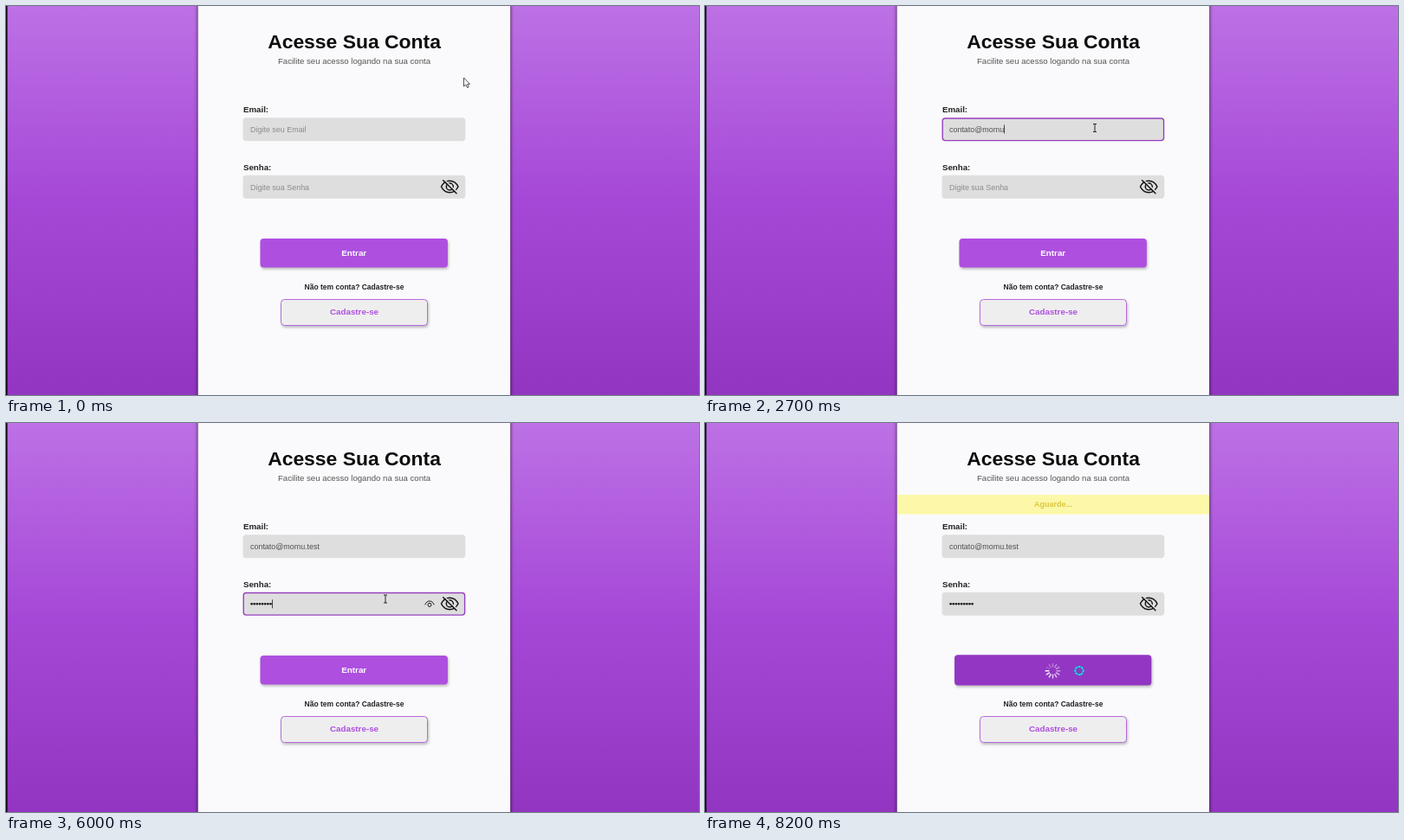
These frames come from a looping animation (800x450 px, 8.3 s). An HTML page:

```html
<!DOCTYPE html>
<html lang="pt-BR">
<head>
<meta charset="utf-8">
<title>Acesse Sua Conta</title>
<style>
  html, body { margin: 0; width: 100%; height: 100%; overflow: hidden; }
  svg { display: block; width: 100vw; height: 100vh; font-family: "Liberation Sans", Arial, sans-serif; }
  .bold { font-weight: bold; }
  .mid { text-anchor: middle; }
  .label { font-size: 9.7px; fill: #222; }
  .value { font-size: 8.93px; fill: #505050; }
  .hint { font-size: 8.95px; fill: #8b8b8b; }
  .field { fill: #dedede; stroke-width: 1.4; }
  .line { fill: none; stroke: #161616; }
  .button { filter: drop-shadow(1.5px 2px 1.5px rgba(0, 0, 0, .25)); }
</style>
</head>
<body>
<svg viewBox="0 0 800 450">
  <defs>
    <linearGradient id="sky" x2="0" y2="1">
      <stop stop-color="#bd71e5"/>
      <stop offset=".5" stop-color="#a548d7"/>
      <stop offset="1" stop-color="#9236c1"/>
    </linearGradient>
  </defs>
  <rect width="800" height="450" fill="url(#sky)"/>
  <rect width="1.6" height="450" fill="#100616"/>
  <rect x="221.7" y="-20" width="360.4" height="490" fill="#fafafc" style="filter:drop-shadow(0 0 2px rgba(0,0,0,.8))"/>

  <text class="bold mid" x="402" y="48.7" font-size="22.9" fill="#0d0d0d">Acesse Sua Conta</text>
  <text class="mid" x="402" y="67.2" font-size="9.6" fill="#555">Facilite seu acesso logando na sua conta</text>

  <g id="notice">
    <rect x="222" y="83" width="360" height="22.5" fill="#fcf8a8"/>
    <text class="bold mid" x="402" y="97.4" font-size="9" fill="#dbc63f">Aguarde...</text>
  </g>

  <text class="bold label" x="274" y="123.2">Email:</text>
  <rect id="emailField" class="field" x="274.2" y="130" width="255.4" height="25.6" rx="3"/>
  <text id="emailHint" class="hint" x="282" y="146">Digite seu Email</text>
  <text id="email" class="value" x="282" y="146"></text>

  <text class="bold label" x="274" y="189.6">Senha:</text>
  <rect id="passField" class="field" x="274.2" y="196.5" width="255.4" height="25.6" rx="3"/>
  <text id="passHint" class="hint" x="282" y="212.6">Digite sua Senha</text>
  <g id="dots" fill="#181818"></g>
  <rect id="caret" width=".9" height="10" fill="#333"/>

  <g id="reveal" class="line" stroke-width="1">
    <path d="M483.8 210.3C485.5 204.6 492.5 204.6 494.2 210.3"/>
    <circle cx="489" cy="210.4" r="2"/>
  </g>
  <g class="line" stroke-width="1.5" stroke-linecap="round">
    <path d="M502.5 209C507 200 517.500 200 522 209C517.500 218 507 218 502.500 209Z"/>
    <circle cx="512.3" cy="209" r="4"/>
    <path d="M506 201L521.300 216" stroke="#dedede" stroke-width="1.6"/>
    <path d="M504.700 201.700L520 216.700"/>
  </g>

  <rect id="enter" class="button" rx="4"/>
  <text id="enterText" class="bold mid" x="401.7" y="289" font-size="9.85" fill="#fff">Entrar</text>
  <g id="spinner" stroke="#fff" stroke-width="1.5" stroke-linecap="round"></g>

  <text class="bold mid" x="402" y="327.800" font-size="8.5" fill="#222">Não tem conta? Cadastre-se</text>
  <rect class="button" x="317.500" y="339.500" width="169" height="30" rx="4" fill="#eee" stroke="#b56be0"/>
  <text class="bold mid" x="402" y="357.300" font-size="9.8" fill="#ad4fe0">Cadastre-se</text>

  <g id="pointer">
    <path id="arrow" d="M0 0V10L2.400 7.900L4 11.500L5.600 10.800L4.100 7.300H7Z" fill="#fff" stroke="#222" stroke-width=".8"/>
    <path id="beam" class="line" d="M-2 -4.500H2M0 -4.500V4.500M-2 4.500H2" stroke-width=".9"/>
    <path id="hand" d="M-1 0Q0 -1 1 0V4L5 5.200Q6 6 5 11H-1.500L-4 7Q-4 5.500 -1 7Z" fill="#fff" stroke="#222" stroke-width=".8"/>
    <g id="busy" fill="none">
      <circle r="4.700" stroke="#188fc4" stroke-width="2.200"/>
      <circle id="busyGlow" r="4.700" stroke="#3fdcea" stroke-width="1.600" stroke-dasharray="2.400 1.300"/>
    </g>
  </g>
</svg>
<script>
const LOOP = 8300, STEP = 100;
const ADDRESS = "contato@momu.test";
const EMAIL_FOCUS = 1000, PASS_FOCUS = 3800, HOVER = 6300, SUBMIT = 6500;
const PATH = [ // time, x, y
  [0, 528.5, 83], [300, 528.5, 83], [900, 450, 141], [3300, 450, 141],
  [3700, 438, 204], [6000, 438, 203.5], [6400, 422, 290],
  [7000, 422, 290], [7600, 432, 286.5], [LOOP, 432, 286.5]
];

const $ = id => document.getElementById(id);
const set = (el, attrs) => { for (const k in attrs) el.setAttribute(k, attrs[k]); };
const show = (id, on) => { $(id).style.display = on ? "" : "none"; };
const clamp = (v, lo, hi) => Math.min(hi, Math.max(lo, v));
const add = (parent, tag, attrs) => {
  const el = document.createElementNS("http://www.w3.org/2000/svg", tag);
  set(el, attrs);
  return parent.appendChild(el);
};

const dots = Array.from({ length: 9 }, (_, i) =>
  add($("dots"), "circle", { cx: 283.6 + i * 3.13, cy: 209.3, r: 1.3 }));
const spokes = Array.from({ length: 12 }, (_, i) =>
  add($("spinner"), "path", { d: "M4.600 0H8.300", transform: `translate(401.500 286.700) rotate(${i * 30})` }));

function pointerAt(t) {
  const i = PATH.findIndex(p => p[0] > t);
  const [t0, x0, y0] = PATH[i - 1], [t1, x1, y1] = PATH[i];
  const k = (t - t0) / (t1 - t0), e = k * k * (3 - 2 * k);
  return [x0 + (x1 - x0) * e, y0 + (y1 - y0) * e];
}

function render(t) {
  const onEmail = t >= EMAIL_FOCUS && t < PASS_FOCUS;
  const onPass = t >= PASS_FOCUS && t < SUBMIT;
  const loading = t >= SUBMIT;

  const typed = clamp(Math.floor((t - 1400) / 110) + 1, 0, ADDRESS.length);
  const secret = clamp(Math.floor((t - 4150) / 250) + 1, 0, dots.length);
  $("email").textContent = ADDRESS.slice(0, typed);
  dots.forEach((dot, i) => { dot.style.display = i < secret ? "" : "none"; });
  show("emailHint", !typed);
  show("passHint", !secret);
  show("reveal", onPass && secret);
  set($("emailField"), { stroke: onEmail ? "#9640bd" : "#dedede" });
  set($("passField"), { stroke: onPass ? "#9640bd" : "#dedede" });

  show("caret", onEmail || onPass);
  set($("caret"), onEmail
    ? { x: 282 + (typed ? $("email").getComputedTextLength() : 0), y: 137.5 }
    : { x: 282 + secret * 3.13, y: 204.3 });

  const h = clamp((t - HOVER) / 200, 0, 1);
  const mix = (a, b) => Math.round(a + (b - a) * h);
  const w = 216.5 * (1 + .05 * h), ht = 33.6 * (1 + .05 * h);
  set($("enter"), {
    x: 401.7 - w / 2, y: 285.8 - ht / 2, width: w, height: ht,
    fill: `rgb(${mix(174, 147)},${mix(79, 54)},${mix(224, 195)})`
  });
  show("enterText", !loading);
  show("notice", loading);
  show("spinner", loading);
  const head = Math.floor((t - 6400) / 100);
  spokes.forEach((spoke, i) => {
    const age = (((head - i) % 12) + 12) % 12;
    set(spoke, { opacity: .95 - age * .068 });
  });

  const [x, y] = pointerAt(t);
  const inField = (y > 130 && y < 156) || (y > 196 && y < 223);
  const kind = loading ? "busy" : y > 269 ? "hand" : inField ? "beam" : "arrow";
  for (const id of ["arrow", "beam", "hand", "busy"]) show(id, id === kind);
  set($("pointer"), { transform: `translate(${x} ${y})` });
  set($("busyGlow"), { transform: `rotate(${t * .36})` });
}

function tick() {
  render(Math.floor(performance.now() % LOOP / STEP) * STEP);
  requestAnimationFrame(tick);
}
tick();
</script>
</body>
</html>
```
